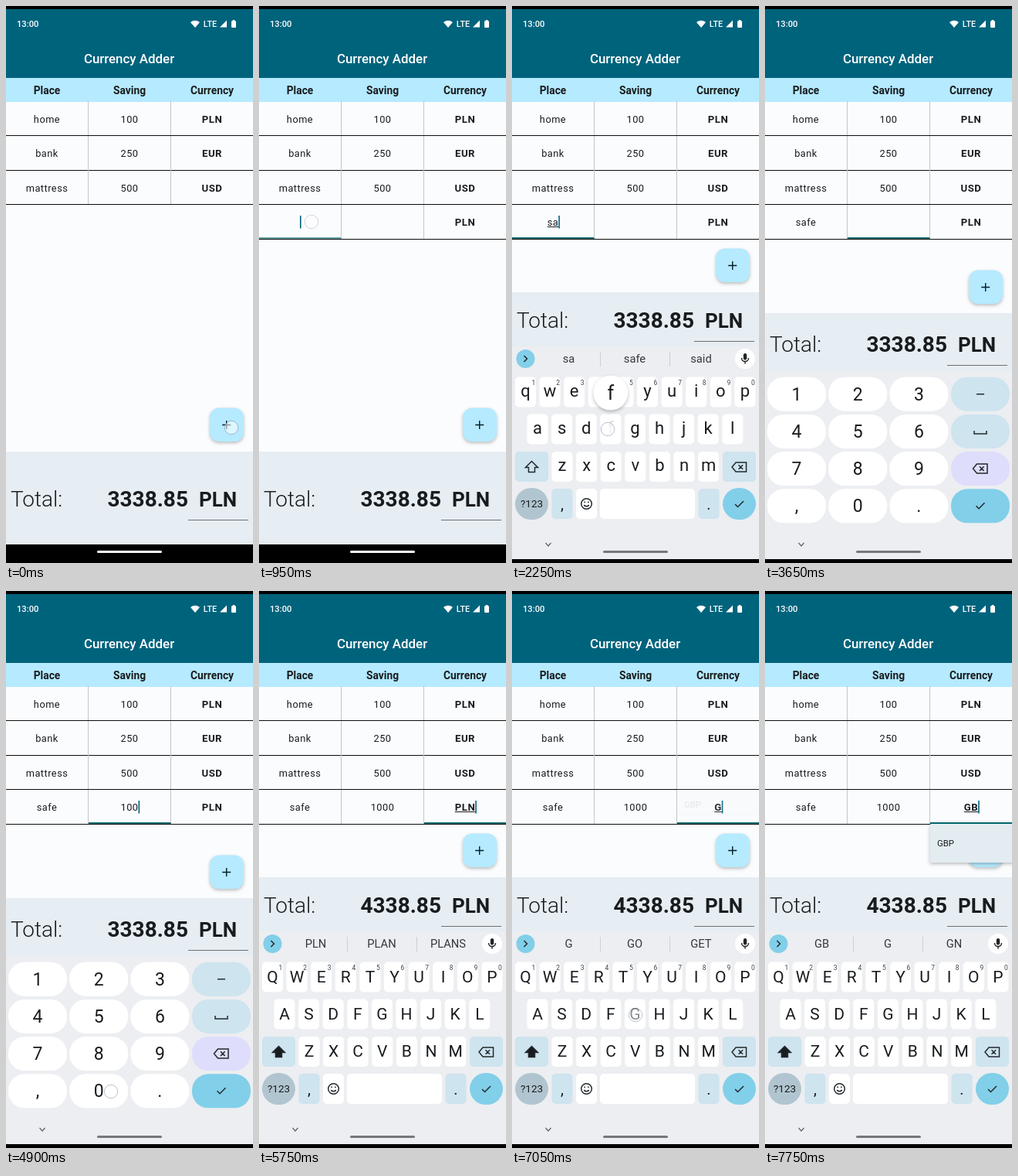
These frames come from a looping animation (320x720 px, 8000 ms). An HTML page:

```html
<!DOCTYPE html>
<html lang="en">
<head>
<meta charset="utf-8">
<title>Savings table</title>
<style>
  html, body { margin: 0; width: 100%; height: 100%; overflow: hidden; background: #000; }
  svg { display: block; width: 320px; height: 720px; font-family: Roboto, sans-serif; }
  .lift { filter: drop-shadow(0 2px 2px rgba(0, 0, 0, .25)); }
  .cell { letter-spacing: .48px; }
  .icon { fill: none; stroke: #23292d; stroke-width: 1.5; }
</style>
</head>
<body>
<svg id="stage" viewBox="0 0 320 720"></svg>
<script>
const INK = '#191c1e', TEAL = '#00637c', SKY = '#b5eaff', AQUA = '#82cfe9', PALE = '#cee4ef';
const LOOP = 8000;

// ---- markup helpers; text is placed by the centre of its capitals ----
const text = (s, x, y, size, o = {}) =>
  `<text x="${x}" y="${y + size * .355}" font-size="${size}" font-weight="${o.w || 400}" fill="${o.fill || INK}"
    text-anchor="${o.at || 'middle'}" class="${o.cls || ''}" ${o.id ? `id="${o.id}"` : ''}>${s}</text>`;
const rect = (x, y, w, h, fill, r = 0, more = '') =>
  `<rect x="${x}" y="${y}" width="${w}" height="${h}" rx="${r}" fill="${fill}" ${more}/>`;
const path = (d, x, y, more = 'class="icon"') => `<path d="${d}" transform="translate(${x} ${y})" ${more}/>`;
const key = (name, x, y, w, h, fill, r) => rect(x - w / 2, y - h / 2, w, h, fill, r, `data-key="${name}"`);

const ERASE = 'M-9.5 0L-4.5-6H9V6H-4.5ZM-1-2.8L4.6 2.8M4.6-2.8L-1 2.8';
const TICK = 'M-5.5 0L-2 3.5L5.5-4';
const COLS = [53, 160, 267];

// ---- table ----
const rowY = i => 146.3 + 44.4 * i;
function rules(i) {
  const bottom = Math.round(167.3 + 44.5 * i);
  return rect(106, bottom - 44, 1, 44, '#c3c5c7') + rect(213, bottom - 44, 1, 44, '#c3c5c7') + rect(0, bottom, 320, 1, '#0c0e0f');
}
const cell = (s, col, row, id) => text(s, COLS[col], rowY(row), col == 2 ? 13.2 : 12.8,
  { w: col == 2 ? 700 : 400, cls: 'cell', id });
const tableRow = (cells, row) => cells.map((c, i) => cell(c, i, row)).join('') + rules(row);

function screen() {
  const edit = COLS.map((x, i) => cell('', i, 3, 'edit' + i)).join('');
  return rect(0, 4, 320, 716, '#fbfcfe') + rect(0, 4, 320, 89, TEAL) + rect(0, 93, 320, 31, SKY)
    + text('13:00', 14, 23.5, 11.2, { w: 500, fill: '#fff', at: 'start' })
    + path('M-6-2.5Q0-7 6-2.5L0 4.5Z', 245, 23.5, 'fill="#fff"')
    + text('LTE', 264.5, 23.5, 10.8, { w: 500, fill: '#fff' })
    + path('M9 0V9H0Z', 277, 18.5, 'fill="#fff"')
    + rect(292, 19.2, 6, 8.8, '#fff', 1) + rect(293.7, 18, 2.6, 2, '#fff')
    + text('Currency Adder', 159.5, 68.5, 16.9, { w: 500, fill: '#fff' })
    + ['Place', 'Saving', 'Currency'].map((s, i) => text(s, COLS[i], 109, 13.8, { w: 700 })).join('')
    + tableRow(['home', 100, 'PLN'], 0) + tableRow(['bank', 250, 'EUR'], 1) + tableRow(['mattress', 500, 'USD'], 2)
    + `<g id="newRow">${rules(3)}${edit}</g>`
    + rect(0, 299, 106.5, 2, '#056a6d', 0, 'id="focus"')
    + rect(0, 285, 10, 1, INK, 0, 'id="under"') + rect(0, 271, 1.6, 16.5, TEAL, 0, 'id="caret"')
    + `<g id="fab" class="lift">${rect(264, 519.5, 44, 43.5, SKY, 12)}${path('M-5.5 0H5.5M0-5.5V5.5', 285.7, 541.5, 'stroke="#001f28" stroke-width="1.4"')}</g>`
    + rect(0, 576, 320, 360, '#e6edf3', 0, 'id="panel"')
    + `<g id="sum">${text('Total:', 6, 637.5, 28, { w: 300, at: 'start' })}
       ${text('', 236, 637.5, 28, { w: 700, at: 'end', id: 'total' })}
       ${text('PLN', 274.5, 637.5, 26, { w: 700 })}${rect(236, 664, 78, 1, '#6c7175')}</g>`
    + `<g id="menu"><g class="lift">${rect(213.5, 301, 108, 50, '#e3ecf1', 2, 'id="sheet"')}</g>${text('', 223, 326, 11.4, { at: 'start', id: 'option' })}</g>`
    + rect(0, 696, 320, 24, '#000');
}

// ---- keyboards ----
function letterBoard() {
  let s = rect(0, 440, 320, 290, '#eceef1')
    + `<circle cx="17.5" cy="456" r="12" fill="${AQUA}"/>` + path('M-2-4L2 0L-2 4', 17.5, 456)
    + rect(114, 447, 1, 19, '#cdd0d3') + rect(204, 447, 1, 19, '#cdd0d3')
    + [73.5, 159, 245].map((x, i) => text('', x, 456, 14.7, { fill: '#33383b', id: 'hint' + i })).join('')
    + '<circle cx="302" cy="456" r="13" fill="#fff"/>' + rect(299.8, 449, 4.4, 8.5, '#202427', 2.2)
    + path('M-4.5-1A4.5 4.5 0 0 0 4.5-1M0 3.5V6.5', 302, 456);
  [['qwertyuiop', 17.5, 499], ['asdfghjkl', 33, 547], ['zxcvbnm', 65, 595.5]].forEach(([row, x0, y], r) => {
    [...row].forEach((c, i) => {
      const x = x0 + 31.6 * i;
      s += key(c, x, y, 27, 39, '#fff', 5) + text(c, x, y - .5, 21, { cls: 'letter' });
      if (!r) s += text((i + 1) % 10, x + 10.5, 487, 8.5, { fill: '#3c4144' });
    });
  });
  return s + key('shift', 25.5, 595.5, 43, 39, PALE, 5) + path('M0-7.5L8 .5H4V6.5H-4V.5H-8Z', 25.5, 596, 'class="icon" id="shift"')
    + key('erase', 294.5, 595.5, 43, 39, PALE, 5) + path(ERASE, 294.5, 596)
    + key('mode', 25.5, 643.5, 43, 41, '#b1c5d0', 20.5) + text('?123', 25.5, 643.5, 13.5)
    + key(',', 65, 643.5, 27, 39, PALE, 5) + text(',', 65, 644, 20)
    + key('emoji', 96.5, 643.5, 27, 39, '#fff', 5)
    + path('M6.8 0A6.8 6.8 0 1 1-6.8 0A6.8 6.8 0 1 1 6.8 0M-3.4 1.6Q0 5 3.4 1.6M-2.4-2.9V-1.3M2.4-2.9V-1.3', 96.5, 643.5)
    + key('space', 175.5, 643.5, 123, 39, '#fff', 5)
    + key('.', 255, 643.5, 27, 39, PALE, 5) + text('.', 255, 644, 20)
    + key('go', 294.5, 643.5, 43, 41, AQUA, 20.5) + path(TICK, 294.5, 644);
}

function numberBoard() {
  let s = rect(0, 472, 320, 250, '#eceef1');
  const side = [['dash', PALE], ['blank', PALE], ['wipe', '#dfddfc'], ['next', AQUA]];
  const icons = ['M-5 0H5', 'M-8-1V3H8V-1', ERASE, TICK];
  ['123', '456', '789', ',0.'].forEach((row, r) => {
    const y = 501.7 + 48.2 * r;
    [...row].forEach((c, i) => {
      const x = 41 + 79.2 * i;
      s += key(c, x, y, 76, 44, '#fff', 21) + text(c, x, y, 23);
    });
    s += key(side[r][0], 279, y, 76, 44, side[r][1], 21) + path(icons[r], 279, y);
  });
  return s;
}

const $ = id => document.getElementById(id);
$('stage').innerHTML = screen()
  + `<g id="board"><g id="letters">${letterBoard()}</g><g id="numbers">${numberBoard()}</g>
     ${path('M-3.5-2L0 2L3.5-2', 47, 696, 'fill="none" stroke="#5f6467" stroke-width="1.2"')}</g>`
  + rect(118, 704, 84, 3, '#fff', 1.5, 'id="pill"') + rect(0, 715, 320, 5, '#000') + rect(0, 0, 320, 4, '#000')
  + `<g id="bubble"><circle r="22.5" cy="-1" fill="#fff" class="lift"/>${text('', 0, -1, 25, { id: 'bubbleText' })}</g>`
  + '<circle id="dot" r="8.7" fill="rgba(255,255,255,.55)" stroke="rgba(105,115,150,.5)" stroke-width=".9"/>';

// ---- script of the demo ----
// x, y, press, release, key
const taps = [
  [292, 545, -100, 70], [68, 279, 840, 900],
  [66, 548, 1560, 1640, 's'], [34, 548, 1900, 1980, 'a'], [124, 547, 2200, 2290, 'f'], [81, 500, 2530, 2620, 'e'],
  [296, 645, 2850, 3060, 'go'],
  [43, 503, 4120, 4210, '1'], [130, 648, 4400, 4480, '0'], [134, 646, 4640, 4720, '0'], [136, 647, 4880, 4960, '0'],
  [282, 647, 5350, 5450, 'next'],
  [299, 597, 6020, 6090, 'erase'], [304, 597, 6270, 6350, 'erase'], [303, 597, 6560, 6640, 'erase'],
  [160, 548, 6960, 7040, 'g'], [192, 597, 7440, 7520, 'b'],
];
// time, column, value
const edits = [
  [920, 0, ''], [1640, 0, 's'], [1980, 0, 'sa'], [2290, 0, 'saf'], [2620, 0, 'safe'],
  [3140, 1, ''], [4210, 1, '1'], [4480, 1, '10'], [4720, 1, '100'], [4960, 1, '1000'],
  [5500, 2, 'PLN'], [6090, 2, 'PL'], [6350, 2, 'P'], [6640, 2, ''], [7040, 2, 'G'], [7520, 2, 'GB'],
];
const hints = {
  s: 's so see', sa: 'sa safe said', saf: 'saf safe safety', safe: 'safe safely safety',
  PL: 'PL PLEASE PLAN', P: 'P PLEASE PEOPLE', PLN: 'PLN PLAN PLANS', G: 'G GO GET', GB: 'GB G GN',
};

const clamp = v => Math.max(0, Math.min(1, v));
const ramp = (t, from, len) => clamp((t - from) / len);
const ease = p => 1 - (1 - p) ** 3;
const move = (id, x, y) => $(id).setAttribute('transform', `translate(${x} ${y})`);
const show = (id, on) => $(id).setAttribute('opacity', Number(on));
const put = (id, s) => { if ($(id).textContent !== s) $(id).textContent = s; };
const letters = [...document.querySelectorAll('.letter')];
const letterKeys = Object.fromEntries([...document.querySelectorAll('#letters [data-key]')].map(k => [k.dataset.key, k]));

function drawEditor(t) {
  const values = ['', '', 'PLN'];
  const done = edits.filter(e => e[0] <= t);
  for (const [, col, v] of done) values[col] = v;
  values.forEach((v, i) => put('edit' + i, v));
  const active = done.length > 0;
  const [since, col, value] = active ? done[done.length - 1] : [0, 0, ''];
  const width = $('edit' + col).getComputedTextLength();
  show('newRow', ramp(t, 150, 250));
  show('focus', ramp(t, 900, 80));
  show('caret', active && (t - since) % 1000 < 500);
  $('focus').setAttribute('x', [0, 107, 214][col]);
  $('caret').setAttribute('x', COLS[col] + width / 2);
  $('under').setAttribute('x', COLS[col] - width / 2);
  $('under').setAttribute('width', width);
  show('under', active && col != 1);
  (hints[value] || '  ').split(' ').forEach((w, i) => put('hint' + i, w));
}

function drawLayout(t) {
  const open = ease(ramp(t, 1000, 300));
  const low = ease(ramp(t, 3140, 90)) - ease(ramp(t, 5500, 90));
  const shift = (full, back) => -full * open + back * low;
  move('fab', 0, shift(206, 28));
  move('panel', 0, shift(206, 27));
  move('sum', 0, shift(231, 31));
  move('board', 0, 282 * (1 - open));
  const digits = t >= 3140 && t < 5500, upper = t >= 5500;
  show('numbers', digits);
  show('letters', !digits);
  $('pill').setAttribute('fill', open > .3 ? '#75787a' : '#fff');
  put('total', upper ? '4338.85' : '3338.85');
  letters.forEach(l => {
    l.textContent = upper ? l.textContent.toUpperCase() : l.textContent.toLowerCase();
    l.setAttribute('font-size', upper ? 21 : 22);
    l.setAttribute('dy', upper ? 0 : -1);
  });
  $('shift').style.fill = upper ? INK : 'none';
}

function drawMenu(t) {
  const first = t < 7000, p = ramp(t, first ? 6350 : 7040, 200);
  const out = first ? 1 - ramp(t, 6640, 100) : 1;
  put('option', first ? 'PLN' : 'GBP');
  move('menu', 0, -53 * (1 - p));
  $('sheet').setAttribute('height', 36 + 14 * p);
  show('menu', clamp(p * 1.7) * out);
}

function drawTouch(t) {
  const [x, y, , up, name] = taps.filter(a => a[2] <= t).pop();
  move('dot', x, y);
  show('dot', 1 - ramp(t, up, 150));
  const held = t < up && /^[a-z]$/.test(name || '') ? name : '';
  if (held) {
    const k = letterKeys[held];
    move('bubble', +k.getAttribute('x') + 13.5, +k.getAttribute('y') - 26.5);
    put('bubbleText', t < 5500 ? held : held.toUpperCase());
  }
  letters.forEach(l => l.setAttribute('opacity', l.textContent.toLowerCase() === held ? .15 : 1));
  show('bubble', held !== '');
}

function frame() {
  const t = performance.now() % LOOP;
  drawEditor(t);
  drawLayout(t);
  drawMenu(t);
  drawTouch(t);
  requestAnimationFrame(frame);
}
frame();
</script>
</body>
</html>
```
